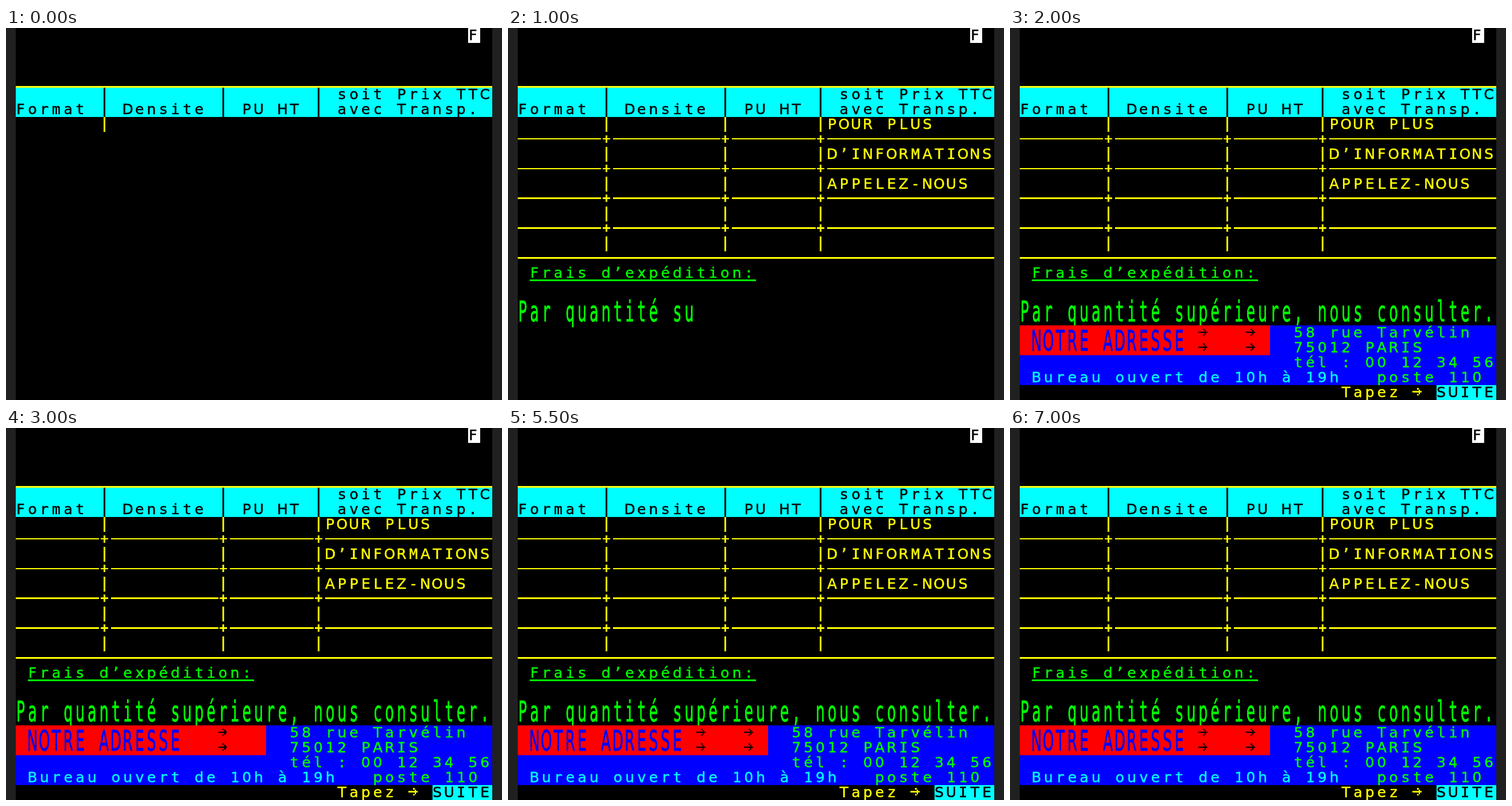
An HTML page with a canvas that plays this animation: 864x648 px, repeating every 8 s.

```html
<!DOCTYPE html>
<html lang="fr">
<head>
<meta charset="utf-8">
<title>Tarifs</title>
<style>
html, body { margin: 0; width: 100%; height: 100%; overflow: hidden; background: #202020; }
canvas { display: block; width: 100%; height: 100%; }
</style>
</head>
<body>
<canvas id="screen" width="864" height="648"></canvas>
<script>
// Videotex page: 40 x 25 cells of 8 x 10 dots.
const ctx = document.getElementById('screen').getContext('2d');
const DOT = 2.592, LEFT = 17.2, TOP = -0.05, LOOP = 8000;
const BLACK = '#000', WHITE = '#fff', RED = '#f00', GREEN = '#0f0';
const BLUE = '#00f', CYAN = '#0ff', YELLOW = '#ff0';
const BARS = [7, 17, 25];
const BLINKS = [2000, 3000, 4000, 4500, 5500, 6500, 7000];
const MONO_GLYPHS = /[filjmrtwIMW1.,:’-]/;

const px = dots => Math.round(LEFT + dots * DOT);
const py = dots => Math.round(TOP + dots * DOT);

function dots(x, y, w, h, color) {
  ctx.fillStyle = color;
  ctx.fillRect(px(x), py(y), px(x + w) - px(x), py(y + h) - py(y));
}

function cells(col, row, w, h, color) {
  dots(col * 8, row * 10, w * 8, h * 10, color);
}

// Double-height text spans two rows and rests on dot 17 of 20.
function text(string, col, row, color, double = false) {
  const baseline = row * 10 + (double ? 17 : 8);
  ctx.fillStyle = ctx.strokeStyle = color;
  ctx.lineWidth = 0.5;
  ctx.lineJoin = 'miter';
  ctx.textAlign = 'center';
  [...string].forEach((char, i) => {
    ctx.font = MONO_GLYPHS.test(char)
      ? '24.8px "DejaVu Sans Mono", monospace'
      : '24.8px "DejaVu Sans", sans-serif';
    ctx.save();
    ctx.translate(LEFT + ((col + i) * 8 + 3.15) * DOT, TOP + baseline * DOT);
    ctx.scale(1, double ? 2 : 1);
    ctx.fillText(char, 0, 0);
    ctx.strokeText(char, 0, 0);
    ctx.restore();
  });
}

function arrow(col, row, color) {
  const x = col * 8, y = row * 10 + 4;
  dots(x, y, 6, 1, color);
  for (const side of [-1, 1]) {
    dots(x + 4, y + side, 1, 1, color);
    dots(x + 3, y + 2 * side, 1, 1, color);
  }
}

function bar(col, row, color = YELLOW) {
  dots(col * 8 + 3, row * 10, 1, 10, color);
}

function bars(row, color) {
  BARS.forEach(col => bar(col, row, color));
}

function rule(row, columns = 40) {
  for (let col = 0; col < columns; col++) {
    const x = col * 8, y = row * 10;
    if (BARS.includes(col)) {
      dots(x + 1, y + 4, 5, 1, YELLOW);
      dots(x + 3, y + 2, 1, 5, YELLOW);
    } else {
      dots(x, y + 4, 8, 1, YELLOW);
    }
  }
}

function drawHeader() {
  cells(38, 0, 1, 1, WHITE);
  text('F', 38, 0, BLACK);
  dots(0, 39, 320, 1, YELLOW);
  cells(0, 4, 40, 2, CYAN);
  bars(4, BLACK);
  bars(5, BLACK);
  text('Format', 0, 5, BLACK);
  text('Densite', 9, 5, BLACK);
  text('PU HT', 19, 5, BLACK);
  text('soit Prix TTC', 27, 4, BLACK);
  text('avec Transp.', 27, 5, BLACK);
  bar(7, 6);
}

function drawUpperTable() {
  ['POUR PLUS', 'D’INFORMATIONS', 'APPELEZ-NOUS'].forEach((line, i) => {
    const row = 6 + 2 * i;
    bars(row);
    text(line, 26, row, YELLOW);
  });
  rule(7);
  rule(9);
  rule(11, 18);
}

function drawLowerTable() {
  rule(11);
  bars(12);
  rule(13);
  bars(14);
  dots(0, 154, 320, 1, YELLOW);
  text('Frais d’expédition:', 1, 16, GREEN);
  dots(8, 169, 19 * 8, 1, GREEN);
}

function drawAddress(complete, blinkCount) {
  cells(0, 20, 21, 2, RED);
  cells(21, 20, 19, 1, BLUE);
  cells(21, 21, complete ? 19 : 4, 1, BLUE);
  text('NOTRE ADRESSE', 1, 20, BLUE, true);
  for (const col of blinkCount % 2 ? [15, 19] : [17]) {
    arrow(col, 20, BLACK);
    arrow(col, 21, BLACK);
  }
  text('58 rue Tarvélin', 23, 20, GREEN);
  text(complete ? '75012 PARIS' : '75', 23, 21, GREEN);
}

function drawFooter() {
  cells(0, 22, 40, 2, BLUE);
  text('tél : 00 12 34 56', 23, 22, GREEN);
  text('Bureau ouvert de 10h à 19h', 1, 23, CYAN);
  text('poste 110', 30, 23, GREEN);
  text('Tapez', 27, 24, YELLOW);
  arrow(33, 24, YELLOW);
  cells(35, 24, 5, 1, CYAN);
  text('SUITE', 35, 24, BLACK);
}

function draw(time) {
  ctx.fillStyle = '#202020';
  ctx.fillRect(0, 0, 864, 648);
  cells(0, 0, 40, 25, BLACK);
  drawHeader();
  if (time >= 500) drawUpperTable();
  if (time >= 1000) {
    const notice = 'Par quantité supérieure, nous consulter.';
    drawLowerTable();
    text(time < 1500 ? notice.slice(0, 15) : notice, 0, 18, GREEN, true);
  }
  if (time >= 1500) drawAddress(time >= 2000, BLINKS.filter(t => time >= t).length);
  if (time >= 2000) drawFooter();
}

function tick() {
  draw(performance.now() % LOOP);
  requestAnimationFrame(tick);
}
tick();
</script>
</body>
</html>
```
